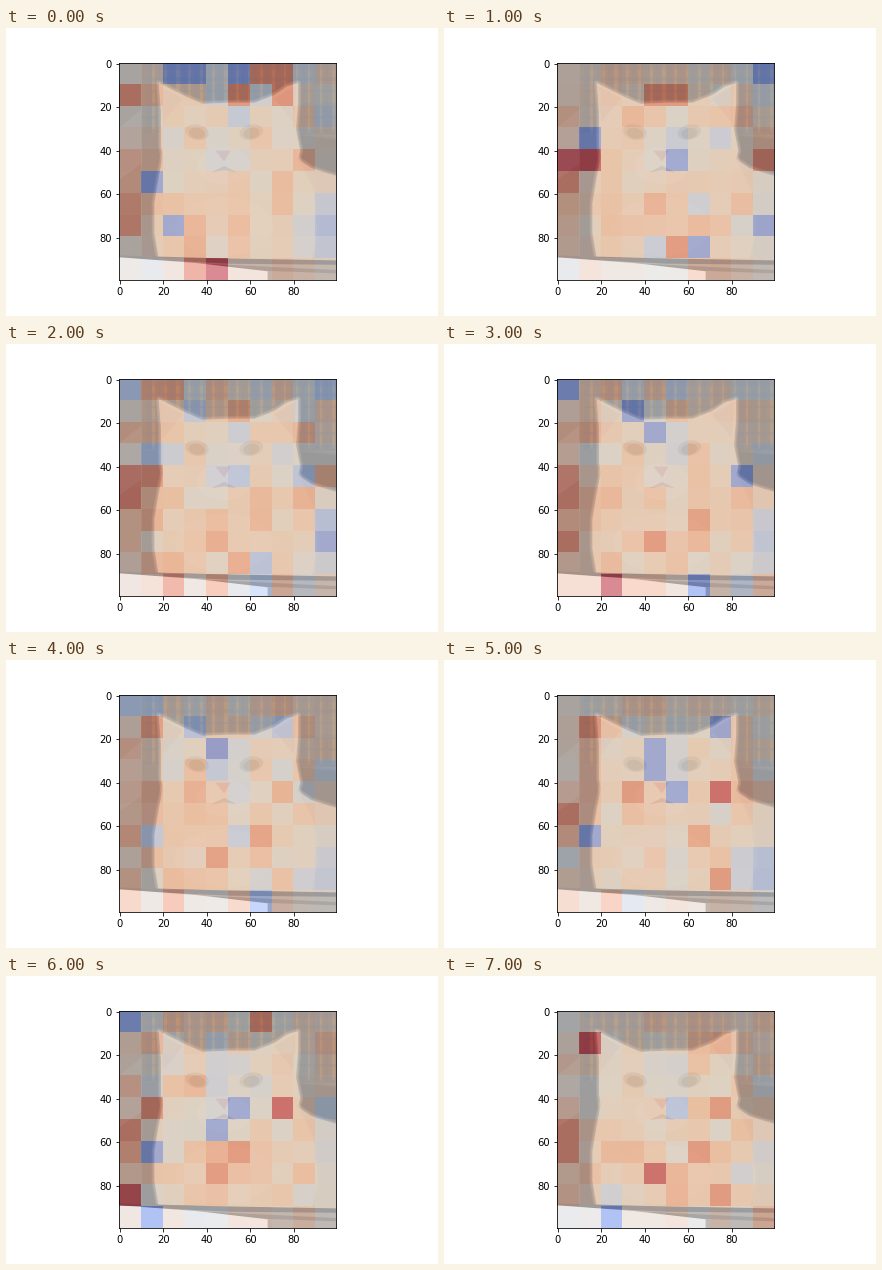
A matplotlib script that plays this animation: 432x288 px, repeating every 8000 ms.

```python
import numpy as np
import matplotlib.pyplot as plt
from matplotlib.animation import FuncAnimation
from matplotlib.patches import Ellipse, Polygon, Rectangle

plt.rcParams.update({
    "font.family": "DejaVu Sans",
    "font.size": 10,
    "figure.subplot.bottom": 0.125,
    "figure.subplot.top": 0.88,
})

N = 10  # tiles per side
ROW, COL = np.mgrid[:N, :N]
rng = np.random.default_rng(4)


def bump(row, col, high, wide):
    return np.exp(-((ROW - row) / high) ** 2 - ((COL - col) / wide) ** 2)


# Warm at the left and below the face, cool on the face and at the right edge
TREND = (0.56 + 0.18 * bump(5.5, 0, 2, 0.9) + 0.06 * bump(6, 5, 2, 3)
         - 0.15 * bump(3, 4.5, 1.8, 0.9) - 0.16 * bump(7, 9, 1.5, 0.8))


def heat(peak, hot, cold):
    """Random tiles around the trend; accents are numbered row * 10 + column."""
    tiles = (TREND + rng.normal(0, 0.07, (N, N))).ravel()
    for cells, level in ((peak, 0.98), (hot, 0.84), (cold, 0.15)):
        tiles[cells] = level
    return tiles.reshape(N, N)


def between(a, b):
    return np.clip((a + b) / 2 + rng.normal(0, 0.06, (N, N)), 0, 1)


first = heat([94], [6, 7, 10, 15, 17, 93], [2, 3, 5, 51, 72])
second = heat([40, 41], [14, 15, 49, 50, 85], [9, 31, 45, 79, 86])
fourth = heat([92], [40, 50, 70, 74], [0, 13, 24, 48, 96])
sixth = heat([47], [11, 43, 50, 87], [17, 24, 34, 45, 61])
seventh = heat([47, 80], [6, 41, 50, 65, 74], [0, 45, 54, 61, 91])
eighth = heat([11, 74], [47, 50, 60, 66, 87], [92])

states = [first, second, between(second, fourth), fourth,
          between(fourth, sixth), sixth, seventh, eighth]

fig, ax = plt.subplots(figsize=(6, 4), dpi=72)
overlay = ax.imshow(first, cmap="coolwarm", vmin=0, vmax=1, alpha=0.5,
                    extent=(-0.5, 99.5, 99.5, -0.5),
                    interpolation="nearest", zorder=1.5)
ax.set_xticks(range(0, 100, 20))
ax.set_yticks(range(0, 100, 20))


def put(patch, rgb, alpha=1, stroke=0):
    color = [v / 255 for v in rgb]
    patch.set(facecolor=color, edgecolor=color, alpha=alpha,
              linewidth=stroke, zorder=1)
    ax.add_patch(patch)


def shape(points, rgb, alpha=1):
    put(Polygon(points), rgb, alpha)


def soft_shape(points, rgb):
    for stroke in (6, 4, 2):
        put(Polygon(points, joinstyle="round"), rgb, 0.2, stroke)
    shape(points, rgb)


def box(x, y, w, h, rgb, alpha=1):
    put(Rectangle((x, y), w, h), rgb, alpha)


def oval(x, y, w, h, rgb, alpha=1, angle=0):
    put(Ellipse((x, y), w, h, angle=angle), rgb, alpha)


# Room and woven cloth behind the cat
BLUE, OCHRE = (80, 92, 110), (150, 126, 88)
box(-1, -1, 102, 102, (112, 110, 106))
box(10, 30, 9, 61, (98, 96, 94))
box(10, -1, 90, 34, (102, 97, 88))
for x in np.arange(12, 100, 5.5):
    box(x, -1, rng.uniform(1, 3), 33, BLUE, 0.4)
    box(x + 3, -1, rng.uniform(0.6, 1.6), 33, OCHRE, 0.5)
for y in np.arange(0, 32, 6):
    box(10, y, 90, rng.uniform(1, 3), BLUE, 0.4)
shape([(-1, 30), (10, 21), (10, 46), (-1, 54)], (120, 122, 122))
soft_shape([(82, 33), (101, 35), (101, 52), (84, 50)], (88, 88, 86))

# Cat
FUR = (221, 200, 171)
soft_shape([(82, 44), (88, 48), (94, 50), (101, 52), (101, 92), (70, 92)],
           (210, 190, 166))
soft_shape([(20, 42), (18, 52), (16, 64), (16, 78), (18, 90), (88, 92),
            (91, 76), (89, 58), (82, 44)], FUR)
soft_shape([(18, 9), (24, 12), (31, 15.5), (38, 18.5), (50, 18), (62, 18),
            (71, 14.5), (77, 10.5), (82, 9), (82, 18), (81, 30), (83, 40),
            (80, 51), (68, 59), (50, 62), (32, 59), (21, 50), (19, 38),
            (19, 22)], FUR)
shape([(18, 10), (29, 16), (20, 27)], (210, 180, 158), 0.5)
shape([(81, 10), (71, 16), (80, 27)], (210, 180, 158), 0.5)
oval(48, 47, 25, 17, (228, 212, 192), 0.4)
oval(48, 75, 45, 27, (230, 210, 184), 0.4)
for x, tilt in ((35.5, 12), (60.5, -12)):
    oval(x, 31.5, 11, 7, (184, 160, 134), 0.5, tilt)
    oval(x, 32, 7.5, 5, (166, 150, 116), 0.6, tilt)
shape([(44, 40), (51, 40), (48, 45)], (205, 150, 136), 0.6)
shape([(42, 50), (48, 47), (54, 50), (48, 49)], (186, 150, 132), 0.6)

# Table edge
shape([(-1, 88.5), (101, 91), (101, 100), (-1, 100)], (160, 153, 146))
shape([(-1, 88.2), (45, 89.5), (101, 90.5), (101, 92.5), (50, 92), (-1, 89.5)],
      (92, 95, 98))
shape([(40, 92), (101, 95), (101, 96.5), (60, 95)], (118, 115, 112))
shape([(-1, 89), (35, 91.7), (68, 95.5), (68, 100), (-1, 100)], (250, 250, 250))


def update(i):
    overlay.set_data(states[i])
    return [overlay]


anim = FuncAnimation(fig, update, frames=len(states), interval=1000,
                     repeat=True, repeat_delay=0)
plt.show()
```
